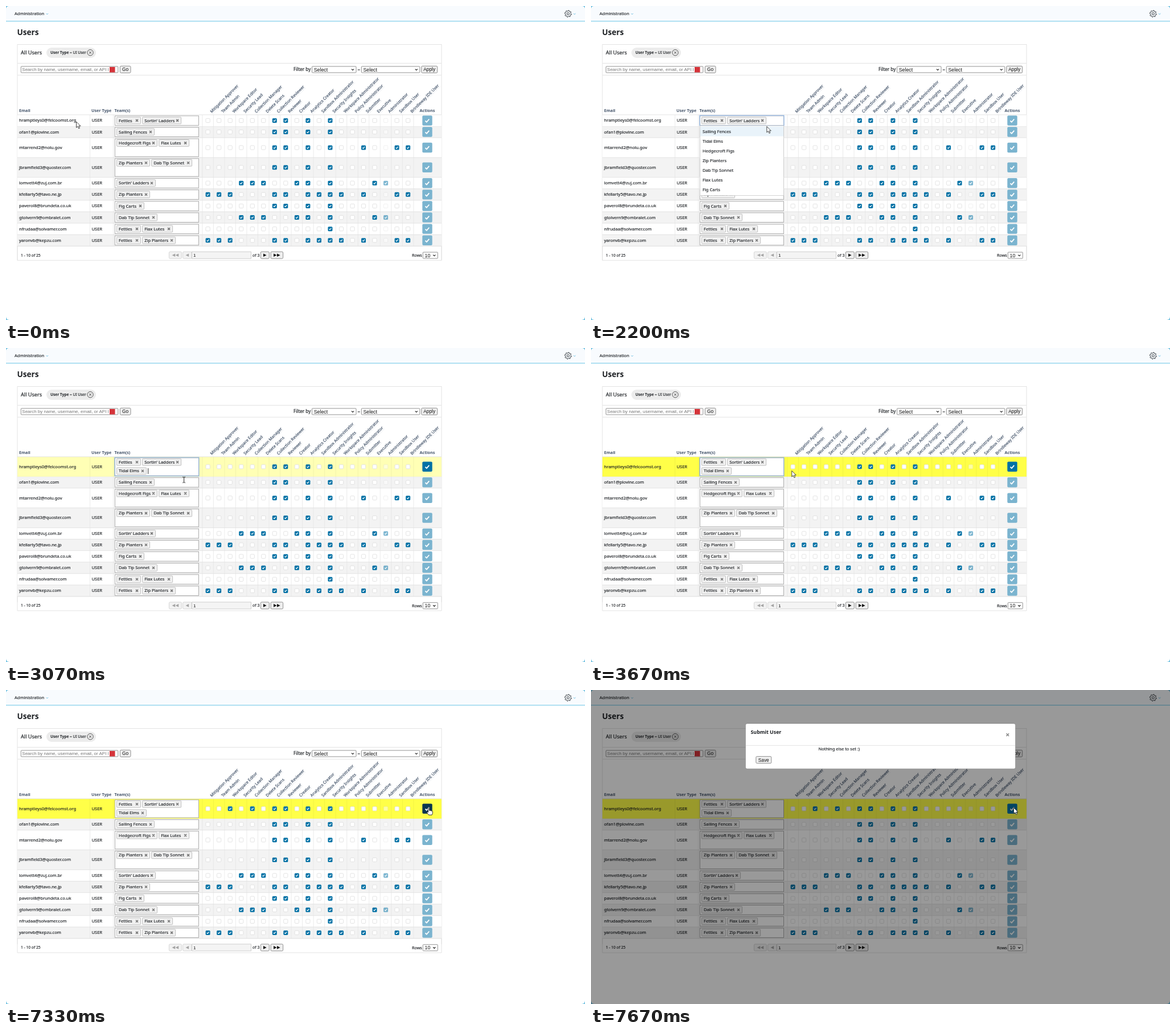
Write an HTML page that moves like this. It is 1017 by 551 pixels and loops after 8 s.

```html
<!DOCTYPE html>
<html lang="en">
<head>
<meta charset="utf-8">
<title>Users</title>
<style>
html, body { margin: 0; width: 100%; height: 100%; overflow: hidden; background: #fff; }
svg { display: block; width: 100vw; height: 100vh; }
text { font: 500 7.55px "Noto Sans", "Open Sans", sans-serif; color: #1d2024; fill: currentColor;
  stroke: currentColor; stroke-width: .16px; white-space: pre; }
.ui { font: 400 8.3px "Liberation Sans", Arial, sans-serif; color: #111; stroke: none; }
.hint { color: #757575; }
.bold { font-weight: 700; stroke: none; }
.semi { font-weight: 600; stroke: none; }
.head { font-weight: 600; color: #44546a; font-size: 7.2px; stroke: none; }
.role { color: #3c4d64; font-size: 7.1px; }
</style>
</head>
<body>
<svg id="stage" viewBox="0 0 1017 551" preserveAspectRatio="none"></svg>
<script>
const LOOP = 8000, TOP = 190.9, LOW = 20.1, TALL = 34.8, GROW = TALL - LOW;
const BLUE = '#0071a5', PALE_BLUE = '#7bb4cf';
const roles = ['Mitigation Approver', 'Team Admin', 'Workspace Editor', 'Security Lead', 'Collection Manager',
  'Delete Scans', 'Collection Reviewer', 'Reviewer', 'Creator', 'Analytics Creator', 'Sandbox Administrator',
  'Security Insights', 'Workspace Administrator', 'Policy Administrator', 'Submitter', 'Executive',
  'Administrator', 'Sandbox User', 'Brindleway IDE User'];
// chip widths by team
const teams = { 'Fettles': 42, "Sortin' Ladders": 68, 'Sailing Fences': 66, 'Hedgecroft Figs': 71, 'Flax Lutes': 53,
  'Zip Planters': 58, 'Dab Tip Sonnet': 71, 'Fig Carts': 48, 'Tidal Elms': 52 };
const names = Object.keys(teams);
const basic = [6, 7, 9, 11];
const lead = [3, 4, 5, 8, 9, 11, 15, 16];
const full = [0, 1, 2, 6, 7, 9, 10, 11, 12, 14, 17, 18];
const users = [
  ['hramptleys0@felcoomst.org', [0, 1], basic],
  ['ofan1@plovine.com', [2], basic],
  ['mtarrend2@nolu.gov', [3, 4], [...basic, 14, 17, 18], true],
  ['jbramfield3@quoster.com', [5, 6], basic, true],
  ['lomvett4@zuj.com.br', [1], lead],
  ['kfellarty5@tavo.ne.jp', [5], full],
  ['paverol8@brundeta.co.uk', [7], basic],
  ['gtolvern9@ombralet.com', [6], lead],
  ['nfrudaa@solvamer.com', [0, 4], [11]],
  ['yaronvb@kepzu.com', [0, 5], full]
];

const colX = i => 354.6 + 19.53 * i;
const rect = (x, y, w, h, fill, stroke = 'none', rx = 0, more = '') =>
  `<rect x="${x}" y="${y}" width="${w}" height="${h}" rx="${rx}" fill="${fill}" stroke="${stroke}" ${more}/>`;
const line = (x1, y1, x2, y2, c = '#e3e3e3', w = 1) =>
  `<path d="M${x1} ${y1}L${x2} ${y2}" stroke="${c}" stroke-width="${w}"/>`;
const text = (x, y, s, size, cls = '', more = '') =>
  `<text x="${x}" y="${y}" class="${cls}" ${size ? `style="font-size:${size}px"` : ''} ${more}>${s}</text>`;
const stroke = (d, c, w) => `<path d="${d}" fill="none" stroke="${c}" stroke-width="${w}" stroke-linejoin="round"/>`;
const cross = (x, y, r, c, w) => stroke(`M${x - r} ${y - r}l${2 * r} ${2 * r}m0 ${-2 * r}l${-2 * r} ${2 * r}`, c, w);
const tick = (x, y, k, w) => stroke(`M${x - 2 * k} ${y + .1 * k}l${1.4 * k} ${1.5 * k}l${2.7 * k} ${-3.2 * k}`, '#fff', w);
const chevron = (x, y, r, c, w = 1) => stroke(`M${x - r} ${y - r / 2}l${r} ${r}l${r} ${-r}`, c, w);
const group = (id, body) => `<g id="${id}">${body}</g>`;

function button(x, y, w, h, label = '', off = false) {
  return rect(x, y, w, h, off ? '#f2f2f2' : '#efefef', off ? '#cfcfcf' : '#767676', 1.8, 'stroke-width=".8"') +
    text(x + w / 2, y + h / 2 + 3, label, 8.3, 'ui', 'text-anchor="middle"');
}
function select(x, y, w, label) {
  return rect(x, y, w, 11, '#fff', '#767676', 1, 'stroke-width=".8"') +
    text(x + 3.2, y + 8.6, label, 8.8, 'ui') + chevron(x + w - 6, y + 5.6, 2.1, '#222', 1.2);
}
function triangles(x, y, count, dir, color) {
  let d = '';
  for (let i = 0; i < count; i++) d += `M${x + (i - (count - 1) / 2) * 6 - 2.8 * dir} ${y - 2.8}v5.6l${5.6 * dir} -2.8z`;
  return `<path d="${d}" fill="${color}"/>`;
}
function checkbox(x, y, on, off) {
  const box = on ? rect(x - 4, y - 4, 8, 8, BLUE, 'none', 1.6) + tick(x, y, .95, 1.2)
    : rect(x - 3.6, y - 3.6, 7.2, 7.2, '#fff', '#dcdcdc', 1.5, 'stroke-width=".8"');
  return off ? `<g opacity=".5">${box}</g>` : box;
}
function chip(x, y, i) {
  const w = teams[names[i]];
  return rect(x, y - 5.9, w, 11.8, '#f1f1f1', '#b8b8b8', 1, 'stroke-width=".9"') +
    text(x + 3.6, y + 2.6, names[i]) + cross(x + w - 6.5, y, 2, '#777', 1.5);
}
function actionButton(y, fill, id) {
  return rect(731.3, y - 8.7, 17.4, 17.4, fill, 'none', 2, id ? `id="${id}"` : '') + tick(739.8, y + .2, 1.65, 1.8);
}
function row(i, y, h, chips, edited) {
  const [email, , checks] = users[i], mid = y + h / 2, grid = edited ? '#00000012' : '#e6e6e6';
  let s = rect(20, y, 745, h, i % 2 ? '#f3f3f3' : '#fff', 'none', 0, edited ? 'id="glow"' : '');
  for (const x of [147.5, 188.5]) s += line(x, y, x, y + h, grid, .8);
  for (let c = 0; c < 20; c++) s += line(colX(c) - 9.77, y, colX(c) - 9.77, y + h, grid, .8);
  s += line(20, y, 765, y, '#dedede', .8);
  s += text(23, mid + 2.5, email) + text(150.5, mid + 2.5, 'USER');
  s += rect(191.3, y + 1.9, 147.2, h - 3.5, '#fff', '#a2a2a2', 0, 'stroke-width=".9"');
  let x = 194.5, cy = y + (h > LOW ? 9.3 : 10);
  for (const k of chips) {
    const w = teams[names[k]];
    if (x + w > 336) { x = 194.5; cy += 15.6; }
    s += chip(x, cy, k);
    x += w + 3.1;
  }
  roles.forEach((_, c) => s += checkbox(colX(c), mid, checks.includes(c), c === 16));
  return s + actionButton(mid, edited ? BLUE : PALE_BLUE, edited && 'apply');
}
function gear(x, y) {
  let d = '';
  for (let k = 0; k < 32; k++) {
    const r = k % 4 < 2 ? 6 : 4.5, a = (k + .5) * Math.PI / 16;
    d += `${k ? 'L' : 'M'}${(x + r * Math.cos(a)).toFixed(2)} ${(y + r * Math.sin(a)).toFixed(2)}`;
  }
  return stroke(d + 'z', '#30363c', 1) + `<circle cx="${x}" cy="${y}" r="2" fill="none" stroke="#30363c"/>`;
}

function header() {
  let s = rect(0, 0, 1017, 551, '#75c3e2') + rect(0, 0, 1017, 551, '#fff', 'none', 6) +
    `<path d="M0 26.5V6Q0 0 6 0H1011Q1017 0 1017 6V26.5z" fill="#f8fbfe"/>` + line(0, 26.7, 1017, 26.7, '#86d0ec', 1.2) +
    text(15, 16, 'Administration', 7.5) + chevron(72.3, 13.9, 1.8, '#6dbfe2') +
    gear(987.3, 13.6) + chevron(998.7, 13.9, 1.8, '#6dbfe2') +
    text(19.5, 51, 'Users', 13.6, 'semi');
  s += line(20, 67.5, 765, 67.5) + line(20, 100.5, 765, 100.5) + line(20, 121.3, 765, 121.3) +
    line(20, 67, 20, 446.3) + line(765, 67, 765, 446.3) +
    text(26, 85, 'All Users', 9.1) + rect(71, 73, 87, 18, '#ececec', 'none', 9) +
    text(78, 84.4, '<tspan class="bold">User Type</tspan> = UI User', 6.6) +
    `<circle cx="148" cy="81.8" r="5.2" fill="none" stroke="#333" stroke-width=".8"/>` + cross(148, 81.8, 2, '#333', .8);
  s += rect(26.3, 106, 170.5, 11, '#fff', '#767676', 1, 'stroke-width=".8"') +
    text(28.3, 114.3, 'Search by name, username, email, or API I', 8, 'ui hint') +
    rect(182, 107, 9.5, 9.5, '#d5343a') + button(200.3, 105.4, 18.7, 12, 'Go') +
    text(505, 114.4, 'Filter by', 8.1) + select(537.5, 106, 77.5, 'Select') + text(617.4, 114.2, '=', 7.9) +
    select(624.3, 106, 102.5, 'Select') + button(729.7, 105.4, 28, 12, 'Apply');
  [[23, 'Email'], [150, 'User Type'], [190.5, 'Team(s)'], [726.5, 'Actions']].forEach(([x, t]) => s += text(x, 186.4, t, 0, 'head'));
  roles.forEach((r, i) => s += `<g class="tilt" transform="translate(${colX(i) + 7} 188) rotate(-45)">${text(0, 0, r, 0, 'role')}</g>`);
  return s;
}
function pager() {
  const y = 437.2, b = y - 6;
  return line(20, 421.3, 765, 421.3, '#dedede') + line(20, 446.3, 765, 446.3) +
    line(20, 421, 20, 446.3) + line(765, 421, 765, 446.3) +
    text(26, y + 2.5, '1 - 10 of 25', 6.7) +
    button(286.4, b, 22, 12, '', true) + triangles(297.4, y, 2, -1, '#a5a5a5') +
    button(310.6, b, 15.4, 12, '', true) + triangles(318.3, y, 1, -1, '#a5a5a5') +
    rect(326.4, b, 104, 12, '#f4f4f4', '#c4c4c4', 0, 'stroke-width=".8"') + text(329, y + 3, '1', 8, 'ui') +
    text(433, y + 2.5, 'of 3', 7) +
    button(447.3, b, 15, 12) + triangles(454.8, y, 1, 1, '#111') +
    button(465, b, 21.6, 12) + triangles(475.8, y, 2, 1, '#111') +
    text(713, y + 2.8, 'Rows', 7.2) + select(732.3, y - 5.2, 26, '10');
}
function dropdown() {
  let s = rect(191.3, 210, 147.2, 122.4, '#fff', '#c9c9c9', 0, 'stroke-width=".8"') +
    rect(191.8, 211.5, 146.2, 17, '#e9f3fa', 'none', 0, 'id="pick"');
  [2, 8, 3, 5, 6, 4, 7].forEach((k, i) => s += text(196, 222.8 + 17.1 * i, names[k]));
  return s;
}
function modal() {
  return rect(271.5, 59, 474, 79.2, '#fff', '#00000044', 3, 'stroke-width=".7"') + line(272, 97.3, 745, 97.3) +
    text(280.5, 77.3, 'Submit User', 8.8, 'semi') + cross(731.8, 78.6, 2.3, '#8c8c8c', 1.6) +
    text(399.5, 105.8, 'Nothing else to set :)', 7.5, '', 'font-style="italic" style="font-style:italic"') +
    button(289.8, 116.6, 27, 12, 'Save');
}
function cursors() {
  const outline = (d, w) => `<path d="${d}" fill="#fff" stroke="#1a1a1a" stroke-width="${w}" stroke-linejoin="round"/>`;
  return group('arrow', outline('M0 0V10.4L2.5 8.2L4.2 12L6 11.2L4.3 7.6H7.5Z', .8)) +
    group('beam', stroke('M-2.3 -5Q0 -5 0 -4V4Q0 5 -2.3 5M2.3 -5Q0 -5 0 -4M0 4Q0 5 2.3 5', '#222', 1)) +
    group('hand', outline('M-1 1Q0 -.6 1.2 1V5Q2.6 4.2 3.2 5.3Q4.5 4.7 5 5.8Q6.8 5.5 6.8 7.3V9.6Q6.4 11 5.6 12.8H-.2Q-1 11 -3.4 8.6Q-4 7 -2.3 7.3L-1 8.3Z', .9));
}

function build() {
  let below = '', y = TOP + LOW;
  users.forEach(([, chips, , tall], i) => {
    if (!i) return;
    const h = tall ? TALL : LOW;
    below += row(i, y, h, chips);
    y += h;
  });
  const mid = TOP + TALL / 2;
  const ring = (id, h) => group(id, rect(190.9, TOP + 1.2, 148, h - 2.2, 'none', '#8db4e4', 0, 'stroke-width="1.2"'));
  return header() + group('below', below + pager()) +
    group('before', row(0, TOP, LOW, [0, 1]) + ring('ring', LOW) + group('caretA', line(309.5, 196, 309.5, 206, '#222', .8))) +
    group('after', row(0, TOP, TALL, [0, 1, 8], true) + ring('ring2', TALL) +
      group('caretB', line(249.7, 211, 249.7, 221, '#222', .9)) +
      group('press', rect(colX(4) - 3.6, mid - 3.6, 7.2, 7.2, '#d9d9d2', '#b8b8b0', 1.5, 'stroke-width=".8"')) +
      group('checkA', checkbox(colX(2), mid, true)) + group('checkB', checkbox(colX(4), mid, true))) +
    group('list', dropdown()) +
    group('shade', rect(0, 0, 1017, 551, '#000', 'none', 0, 'fill-opacity=".4"') + modal()) +
    group('cursor', cursors());
}

document.getElementById('stage').innerHTML = build();
const el = id => document.getElementById(id);
const show = (id, on) => el(id).style.display = on ? '' : 'none';
// dotted underline below each tilted heading
document.querySelectorAll('.tilt').forEach(g => {
  const w = g.firstChild.getComputedTextLength();
  g.insertAdjacentHTML('beforeend', `<path d="M0 2.2H${w}" stroke="#b9c3cf" stroke-width=".5" stroke-dasharray=".8 1"/>`);
});

// start, end, target x, target y
const moves = [[560, 1330, 308, 204], [2100, 2400, 311, 232], [3000, 3600, 352.5, 215.5], [3640, 4400, 396.5, 209],
  [4840, 5130, 426.5, 210], [5370, 5500, 430, 211], [5880, 6730, 696, 211], [6770, 7330, 742.5, 206.5]];
const clamp = v => Math.max(0, Math.min(1, v));
const ease = v => v * v * (3 - 2 * v);

function pointer(t) {
  let x = 123.5, y = 203;
  for (const [a, b, tx, ty] of moves) {
    const p = ease(clamp((t - a) / (b - a)));
    x += (tx - x) * p;
    y += (ty - y) * p;
  }
  return [x, y];
}

function draw(t) {
  const [x, y] = pointer(t), edited = t >= 2800, open = t >= 1470 && !edited, dialog = t >= 7530;
  show('before', !edited);
  show('after', edited);
  el('below').setAttribute('transform', `translate(0 ${edited ? GROW : 0})`);
  show('list', open);
  el('pick').setAttribute('y', y > 227 ? 228.6 : 211.5);
  el('ring').style.opacity = open ? clamp((t - 1400) / 330) : 0;
  show('caretA', open && (t - 1470) % 1000 < 500);
  show('caretB', t < 4530 && (t - 2800) % 1000 < 500);
  show('ring2', t < 4530);
  const glow = clamp((t - 2710) / 890);
  el('glow').setAttribute('fill', `rgb(255,255,${Math.round(255 - 183 * glow)})`);
  show('checkA', t >= 4600);
  show('press', t >= 5530 && t < 5730);
  show('checkB', t >= 5730);

  const hand = x > 731 && !dialog;
  const beam = x > 191 && x < 338 && (y < 210 || edited);
  el('apply').setAttribute('fill', hand ? '#0a3550' : BLUE);
  show('hand', hand);
  show('beam', beam);
  show('arrow', !hand && !beam);
  el('cursor').setAttribute('transform', `translate(${x.toFixed(2)} ${y.toFixed(2)})`);
  show('shade', dialog);
  el('shade').style.opacity = clamp((t - 7460) / 210);
}

const start = performance.now();
function frame() {
  draw((performance.now() - start) % LOOP);
  requestAnimationFrame(frame);
}
draw(0);
requestAnimationFrame(frame);
</script>
</body>
</html>
```
